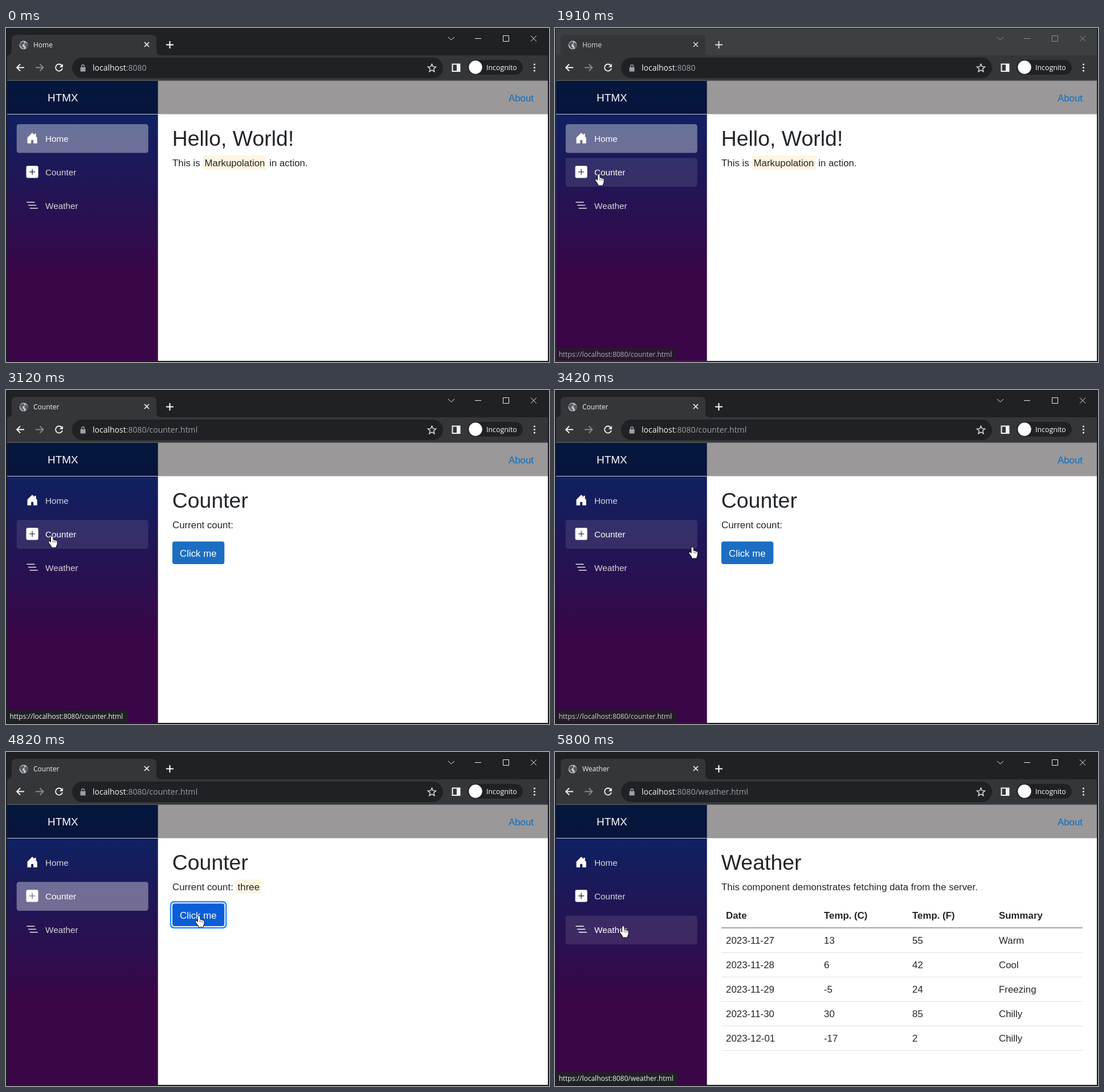
These frames come from a looping animation (953 px wide and 587 px high, 8.94 s). An HTML page with a canvas:

```html
<!DOCTYPE html>
<html lang="en">
<head>
<meta charset="utf-8">
<title>Page navigation demo</title>
<style>
html, body { margin: 0; width: 953px; height: 587px; overflow: hidden; background: #18181a; }
canvas { display: block; }
</style>
</head>
<body>
<canvas width="953" height="587"></canvas>
<script>
const LOOP = 8940;
const c = document.querySelector('canvas').getContext('2d');
const UI = '"Open Sans", "Noto Sans", sans-serif';
const PAGE = '"Liberation Sans", Arial, sans-serif';
const BODY = 16.87;
const INK = '#212529';

const NAV = [
  ['Home', new Path2D('M6.5 14.5v-3.5c0-.25.25-.5.5-.5h2c.25 0 .5.25.5.5v3.5a.5.5 0 0 0 .5.5h4a.5.5 0 0 0 .5-.5v-7a.5.5 0 0 0-.15-.35L13 5.8V2.5a.5.5 0 0 0-.5-.5h-1a.5.5 0 0 0-.5.5v1.3L8.35 1.15a.5.5 0 0 0-.7 0l-6 6a.5.5 0 0 0-.15.35v7a.5.5 0 0 0 .5.5h4a.5.5 0 0 0 .5-.5')],
  ['Counter', new Path2D('M2 0a2 2 0 0 0-2 2v12a2 2 0 0 0 2 2h12a2 2 0 0 0 2-2V2a2 2 0 0 0-2-2zM8.5 4.5v3h3a.5.5 0 0 1 0 1h-3v3a.5.5 0 0 1-1 0v-3h-3a.5.5 0 0 1 0-1h3v-3a.5.5 0 0 1 1 0')],
  ['Weather', new Path2D('M5 11h10a.5.5 0 0 1 0 1H5a.5.5 0 0 1 0-1M3 7h10a.5.5 0 0 1 0 1H3a.5.5 0 0 1 0-1M1 3h10a.5.5 0 0 1 0 1H1a.5.5 0 0 1 0-1')]
];
const FORECAST = [
  ['2023-11-27', '13', '55', 'Warm'],
  ['2023-11-28', '6', '42', 'Cool'],
  ['2023-11-29', '-5', '24', 'Freezing'],
  ['2023-11-30', '30', '85', 'Chilly'],
  ['2023-12-01', '-17', '2', 'Chilly']
];
const ARROW = new Path2D('M0 0v14l3.2-3 2.2 5 2.2-1-2.2-4.8h4.5z');
const HAND = new Path2D('M-1.8 1.2q1.8-2.4 3.4 0v5.4q1.6-1 2.6.6 1.6-.8 2.4.8 2-.6 2.2 1.2v4q0 2.4-1.6 4.2v2h-8.2v-2l-4.6-6.2q-1-2.6 1.4-2.2l2.4 2z');
const LOCK = new Path2D('M130.5 69h9v7.5h-9zM132 69v-2a3 3 0 0 1 6 0v2h-1.4v-2a1.6 1.6 0 0 0-3.2 0v2z');
const LAND = new Path2D('M24.5 27q4-4 7-3l1 3-3 2-1 3 3 2v3q-5-2-7-7zM34 25l4 3v5l-3 3-1-4-2-2z');

// cursor stops: time, x, y
const PATH = [
  [1410, 17, 276], [1710, 76, 257], [2640, 76, 257], [2860, 80, 257],
  [3120, 80, 257], [3640, 340, 288], [4040, 340, 288], [4300, 338, 288],
  [4820, 338, 288], [5220, 119, 306]
];
const CLICKS = [2540, 3820, 4120, 4380, 5400];

const ramp = (t, a, b) => Math.min(1, Math.max(0, (t - a) / (b - a)));
const ease = p => p * p * (3 - 2 * p);
const mix = (a, b, p) => a + (b - a) * p;

function cursorAt(t) {
  if (t < PATH[0][0]) return null;
  let i = 0;
  while (i < PATH.length - 2 && t >= PATH[i + 1][0]) i++;
  const [a, x, y] = PATH[i], [b, u, v] = PATH[i + 1];
  const p = ease(ramp(t, a, b));
  return [mix(x, u, p), mix(y, v, p)];
}

function rect(x, y, w, h, color) {
  c.fillStyle = color;
  c.fillRect(x, y, w, h);
}
function round(x, y, w, h, r, color) {
  c.fillStyle = color;
  c.beginPath();
  c.roundRect(x, y, w, h, r);
  c.fill();
}
function disc(x, y, r, color) {
  c.fillStyle = color;
  c.beginPath();
  c.arc(x, y, r, 0, 7);
  c.fill();
}
function line(d, color, width = 1) {
  c.strokeStyle = color;
  c.lineWidth = width;
  c.stroke(new Path2D(d));
}
function text(s, x, y, size, color, family = PAGE, weight = '') {
  c.font = `${weight} ${size}px ${family}`;
  c.fillStyle = color;
  c.fillText(s, x, y);
  return x + c.measureText(s).width;
}
function mark(word, x) {
  c.font = `${BODY}px ${PAGE}`;
  const w = c.measureText(word).width;
  rect(x, 224, w + 6.2, 25, '#fff5e1');
  text(word, x + 3.1, 243, BODY, INK);
  return x + w + 6.2;
}

function drawChrome(focused, title, path) {
  rect(1, 1, 950.5, 585, focused ? '#202124' : '#3c4043');
  // tab and toolbar
  c.fillStyle = '#35363a';
  c.fill(new Path2D('M2 48q8 0 8-8V20q0-8 8-8h238q8 0 8 8v20q0 8 8 8h679v44H2z'));
  rect(2, 91.5, 949, 1.5, '#56585b');
  disc(31, 30, 7.5, '#c4c7ca');
  c.fillStyle = '#56595d';
  c.fill(LAND);
  const bright = focused ? '#fff' : '#dadce0';
  text(title, 48, 34, 12, focused ? '#f1f3f4' : '#dadce0', UI);
  line('M243 25l8 8M251 25l-8 8', bright, 1.6);
  line('M281 29.5h13M287.5 23v13', bright, 2);
  line('M776 16l5.5 5 5.5-5M823 18.5h11M872.5 13.5h10v10h-10zM921 13.5l10 10M931 13.5l-10 10', focused ? '#eee' : '#8d9092');

  line('M32 69.5H19.5M25 63.5l-6 6 6 6', '#f1f3f4', 1.9);
  line('M52 69.5h13M59.5 63.5l6 6-6 6', '#86888b', 1.8);
  line('M97.5 65.5a6 6 0 1 0 1.4 5.5', '#f1f3f4', 1.9);
  c.fillStyle = '#f1f3f4';
  c.fill(new Path2D('M99.8 63v6h-6z'));

  round(116, 52, 651, 36, 18, '#202124');
  c.fillStyle = '#9aa0a6';
  c.fill(LOCK);
  const x = text('localhost', 152, 75, 14, '#f1f3f4', UI);
  text(':8080' + path, x, 75, 14, '#9aa0a6', UI);
  line('M747.5 63.3l2 4.6 5 .5-3.8 3.3 1.2 4.9-4.4-2.6-4.4 2.6 1.2-4.9-3.8-3.3 5-.5z', '#dadce0', 1.5);
  line('M783.5 63.5h13v12.5h-13z', '#f1f3f4', 2);
  rect(791, 63, 6, 13, '#f1f3f4');
  round(810, 56, 97, 26, 13, '#202124');
  disc(824, 69, 11.7, '#fff');
  text('Incognito', 843, 73.5, 12.4, '#fff', UI);
  for (const y of [64, 69.5, 75]) disc(927.5, y, 1.6, '#f1f3f4');
}

function drawSidebar(active, hover) {
  const g = c.createLinearGradient(0, 93, 0, 585);
  g.addColorStop(0, 'rgb(5,39,103)');
  g.addColorStop(.7, '#3a0647');
  rect(2, 93, 264.7, 492, g);
  rect(2, 93, 264.7, 58.5, 'rgba(0,0,0,.4)');
  rect(2, 151, 264.7, 1, '#c9cad3');
  text('HTMX', 73, 128.5, 18.9, '#fff');
  NAV.forEach(([name, icon], i) => {
    const y = 169 + i * 59.3;
    const alpha = i === hover && !(i === 0 && active === 0) ? .1 : i === active ? .37 : 0;
    if (alpha) round(18.7, y, 231, 50.6, 4.2, `rgba(255,255,255,${alpha})`);
    const lit = i === hover || i === active;
    c.save();
    c.translate(35.5, y + 14);
    c.scale(1.32, 1.32);
    c.fillStyle = i < 2 || lit ? '#fff' : '#e4e2ea';
    c.fill(icon, 'evenodd');
    c.restore();
    text(name, 69, y + 30.8, 15.3, lit ? '#fff' : '#d7d7d7');
  });
}

function drawButton(t, pressed) {
  const p = ramp(t, 3500, 3650), ring = ramp(t, 3830, 3990);
  const grow = (s, color) => round(292 - s, 266.3 - s, 91.3 + 2 * s, 39.7 + 2 * s, 4 + s * .7, color);
  if (ring) {
    grow(4.2 * ring, `rgba(37,140,251,${ring})`);
    grow(1.8 * ring, '#fff');
  }
  grow(0, `rgb(${mix(27, 11, p)},${mix(110, 94, p)},${mix(194, 215, p)})`);
  if (pressed) grow(0, '#0a58ca');
  text('Click me', 305, 292.7, BODY, '#fff');
}

function drawTable() {
  const xs = [300, 472, 627, 779];
  ['Date', 'Temp. (C)', 'Temp. (F)', 'Summary'].forEach((s, i) => text(s, xs[i], 293.3, BODY, INK, PAGE, 'bold'));
  rect(292, 308.5, 634, 1, '#4b4e52');
  FORECAST.forEach((row, r) => {
    const y = r * 43.1;
    row.forEach((s, i) => text(s, xs[i], 336.5 + y, BODY, INK));
    rect(292, Math.round(351.6 + y), 634, 1, '#dee2e6');
  });
}

function drawContent(t, page, pressed) {
  rect(266.7, 93, 684.3, 58.5, '#9a9899');
  rect(266.7, 151, 684.3, 1, '#d2d1d2');
  rect(266.7, 152, 684.3, 433, '#fff');
  text('About', 882, 128.5, BODY, '#0b6cc0');
  text(page ? NAV[page][0] : 'Hello, World!', 291.7, 206.7, 37.45, INK);
  if (page === 0) {
    const x = mark('Markupolation', text('This is ', 292, 243, BODY, INK));
    text(' in action.', x, 243, BODY, INK);
  } else if (page === 1) {
    const x = text('Current count: ', 292, 243, BODY, INK);
    const count = [3940, 4240, 4500].filter(s => t >= s).length;
    if (count) mark(['one', 'two', 'three'][count - 1], x);
    drawButton(t, pressed);
  } else {
    text('This component demonstrates fetching data from the server.', 292, 243, BODY, INK);
    drawTable();
  }
}

function drawStatus(t) {
  const first = t < 4500;
  c.globalAlpha = first ? ramp(t, 1830, 1950) * (1 - ramp(t, 3400, 3520)) : ramp(t, 5500, 5620);
  c.fillStyle = '#202124';
  c.beginPath();
  c.roundRect(2, 563, first ? 211 : 212.5, 22, [0, 4, 0, 0]);
  c.fill();
  text(`https://localhost:8080/${first ? 'counter' : 'weather'}.html`, 6.5, 578.3, 12, '#f1f3f4', UI);
  c.globalAlpha = 1;
}

function drawCursor([x, y], hand) {
  const shape = hand ? HAND : ARROW;
  c.save();
  c.translate(x + (hand ? .8 : 0), y);
  c.lineJoin = 'round';
  c.lineWidth = 1.6;
  c.strokeStyle = '#000';
  c.stroke(shape);
  c.fillStyle = '#fff';
  c.fill(shape);
  if (hand) line('M1.6 7v4M4.2 8v3.4M6.6 8.6v3', '#333', .7);
  c.restore();
}

function draw(t) {
  const pos = cursorAt(t);
  const page = t < 2780 ? 0 : t < 5640 ? 1 : 2;
  const click = CLICKS.findLast(s => t >= s);
  const pressed = t - click < 100;
  let hover = -1, onButton = false;
  if (pos) {
    const [x, y] = pos;
    hover = x > 19 && x < 250 ? NAV.findIndex((_, i) => y >= 169 + i * 59.3 && y <= 219.6 + i * 59.3) : -1;
    onButton = page === 1 && x > 292 && x < 383 && y > 266 && y < 306;
  }
  rect(0, 0, 953, 587, '#18181a');
  drawChrome(t < 230 || t >= 2540, NAV[page][0], page ? `/${NAV[page][0].toLowerCase()}.html` : '');
  drawSidebar(page, hover);
  drawContent(t, page, pressed && onButton);
  drawStatus(t);
  if (!pos) return;
  drawCursor(pos, hover >= 0 || onButton);
  const glow = 1 - ramp(t - click, 100, 180);
  if (glow > 0) disc(pos[0], pos[1], 12.5, `rgba(255,235,0,${.57 * glow})`);
}

const start = performance.now();
function tick() {
  draw((performance.now() - start) % LOOP);
  requestAnimationFrame(tick);
}
tick();
</script>
</body>
</html>
```
